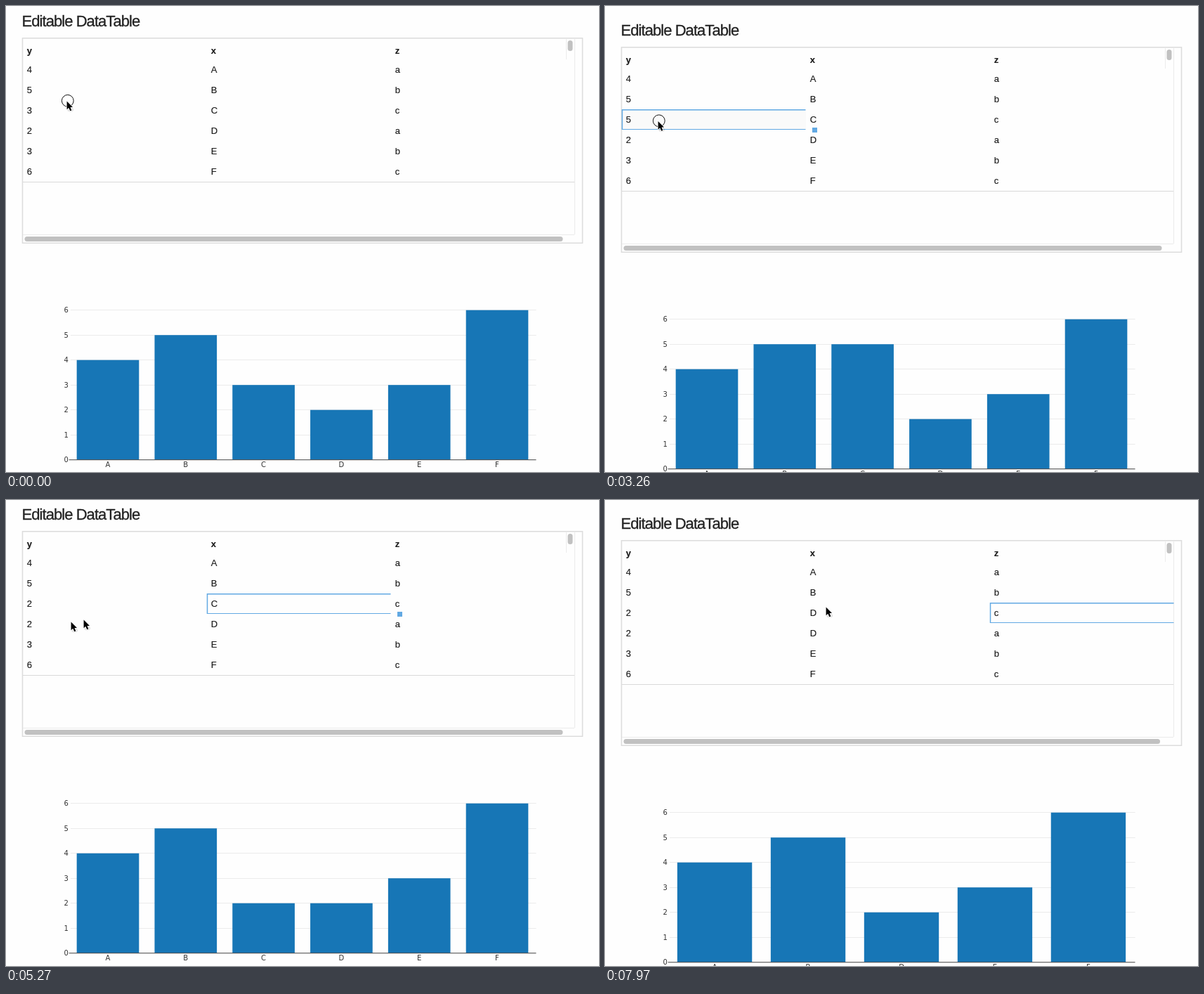
An HTML page that plays this animation: 844x663 px, repeating every 8 s.

```html
<!DOCTYPE html>
<html lang="en">
<head>
<meta charset="utf-8">
<title>Editable table</title>
<style>
html, body { margin: 0; width: 100%; height: 100%; overflow: hidden; background: #fefefe; }
svg { display: block; }
text { font: 13px "Liberation Sans", sans-serif; fill: #1c1c1c; stroke: #1c1c1c; stroke-width: .15px; }
.title { font-size: 22px; letter-spacing: -.94px; fill: #222; stroke: #222; stroke-width: .3px; }
.head { font-weight: bold; }
.tick { font: 10px "DejaVu Sans", sans-serif; fill: #333; stroke: none; }
.value { text-anchor: end; }
.label { text-anchor: middle; }
</style>
</head>
<body>
<svg id="stage" width="844" height="663"></svg>
<script>
const LOOP = 8000, BLUE = '#62a9e3';
const COLUMN_X = [24, 286, 548], COLUMN_W = 262, ROW_TOP = 76, ROW_H = 29;
const stage = document.getElementById('stage');

const initial = {
  scroll: 0, cursor: [86, 135], click: true, ghost: null, hover: null, caret: null,
  column: -1, handle: '', y3: 3, x3: 'C', bars: [4, 5, 3, 2, 3, 6], names: 'ABCDEF'
};

// Each step changes part of the state and holds until the next one.
const steps = [
  [120, { click: false }],
  [390, { cursor: [84, 136] }],
  [500, { cursor: [80.5, 138] }],
  [600, { click: true, column: 0, handle: 'open' }],
  [710, { handle: 'solid' }],
  [1190, { click: false, cursor: [82, 142], caret: 37.5 }],
  [1580, { y3: 5, column: 1, caret: null, scroll: 13, hover: [1, 523, '#fcfcfc'] }],
  [1700, { bars: [4, 5, 5, 2, 3, 6] }],
  [2660, { cursor: [82, 145], hover: null }],
  [2780, { cursor: [79, 152] }],
  [2900, { cursor: [76, 160], hover: [2, 262, '#fafafa'] }],
  [3020, { cursor: [75, 163.5], click: true, column: 0, handle: 'open' }],
  [3140, { handle: 'solid' }],
  [3380, { click: false }],
  [3500, { caret: 37.5 }],
  [3730, { y3: 2, column: 1, caret: null }],
  [3850, { bars: [4, 5, 2, 2, 3, 6] }],
  [4080, { cursor: [77, 166] }],
  [4200, { cursor: [81, 169], hover: null }],
  [4320, { cursor: [87, 172] }],
  [4440, { cursor: [92, 173] }],
  [4670, { scroll: 9 }],
  [4790, { scroll: 3 }],
  [4910, { scroll: -1 }],
  [5270, { ghost: [110, 170] }],
  [5390, { scroll: 0, ghost: null, cursor: [273, 158] }],
  [5540, { cursor: [290, 156] }],
  [5660, { cursor: [304, 154] }],
  [5780, { cursor: [311, 152.5] }],
  [5900, { cursor: [314, 152], handle: 'open' }],
  [6140, { click: true }],
  [6330, { click: false }],
  [6430, { handle: 'solid' }],
  [6910, { caret: 302.5 }],
  [7260, { x3: 'D', column: 2, caret: null, scroll: 13 }],
  [7380, { bars: [4, 5, 2, 3, 6], names: 'ABDEF' }],
  [7970, { scroll: 12 }]
];

const rect = (x, y, w, h, fill, extra = '') =>
  `<rect x="${x}" y="${y}" width="${w}" height="${h}" fill="${fill}" ${extra}/>`;
const line = (x1, y1, x2, y2, color, width = 1) =>
  `<path d="M${x1} ${y1}L${x2} ${y2}" stroke="${color}" stroke-width="${width}"/>`;
const text = (x, y, content, style = '') =>
  `<text x="${x}" y="${y}" class="${style}">${content}</text>`;

function table(s) {
  const ys = [4, 5, s.y3, 2, 3, 6], xs = ['A', 'B', s.x3, 'D', 'E', 'F'];
  let out = '';
  if (s.hover) {
    const [row, width, color] = s.hover;
    out += rect(24, ROW_TOP + row * ROW_H, width, ROW_H, color);
  }
  out += rect(23.5, 45.75, 797, 291.5, 'none', 'stroke="#dcdcdc" stroke-width="1.5"')
    + line(797.5, 47, 797.5, 76, '#ececec') + line(809.5, 47, 809.5, 325, '#ebebeb')
    + line(24, 250.5, 809, 250.5, '#d9d9d9') + line(24, 325.5, 809, 325.5, '#ebebeb')
    + rect(26.5, 328, s.column === 2 ? 763.5 : 766, 7, '#c1c1c1', 'rx="3.5"')
    + rect(799.5, 49, 7, 15, '#c1c1c1', 'rx="3.5"');
  'yxz'.split('').forEach((name, i) => out += text(COLUMN_X[i] + 5.8, 68, name, 'head'));
  ys.forEach((y, i) => {
    [y, xs[i], 'abc'[i % 3]].forEach((v, c) =>
      out += text(COLUMN_X[c] + 5.8, 94.8 + i * ROW_H, v));
  });
  return out + selection(s);
}

function selection({ column, handle, caret }) {
  if (column < 0) return '';
  const x = COLUMN_X[column], right = x + COLUMN_W - .5;
  let out = line(x + .5, 134, x + .5, 163, BLUE, 1.5)
    + line(x, 134.75, right, 134.75, BLUE, 1.5) + line(x, 162.5, right, 162.5, BLUE);
  if (column < 2) {
    out += handle === 'open'
      ? rect(x + 266.5, 155.5, 13, 13, '#fefefe', `stroke="${BLUE}"`)
      : rect(x + 271, 160, 7, 7, BLUE);
  }
  if (caret) out += line(caret, 141, caret, 156, '#222');
  return out;
}

function chart({ bars, names }) {
  const left = 89.6, zero = 645.7, unit = 35.5, pitch = 664.8 / bars.length;
  let out = '';
  for (let v = 0; v <= 6; v++) {
    const y = zero - v * unit;
    if (v) out += line(92, Math.floor(y) + .5, 754.5, Math.floor(y) + .5, '#ebebeb');
    out += text(88.8, y + 3.6, v, 'tick value');
  }
  bars.forEach((v, i) => {
    const x = left + pitch * i;
    out += rect(x + pitch * .1, zero - v * unit, pitch * .8, v * unit, '#1776b6')
      + text(x + pitch / 2, 656.4, names[i], 'tick label');
  });
  return out + line(left, zero, 754.5, zero, '#444');
}

function pointer([x, y], click) {
  return `<g transform="translate(${x + .6} ${y + .6})">`
    + (click ? '<circle cx="1.2" cy="-.8" r="8.4" fill="none" stroke="#111"/>' : '')
    + '<ellipse cx="5" cy="12" rx="4.5" ry="3" fill="#000" opacity=".1"/>'
    + '<path d="M0 0V11.6L2.7 9.2 4.7 13.7 6.8 12.8 4.9 8.5H8.4Z" fill="#000"'
    + ' stroke="#fff" stroke-width="1.4" paint-order="stroke"/></g>';
}

function draw(s) {
  stage.innerHTML = `<g transform="translate(0 ${s.scroll})">`
    + text(22.5, 28.8, 'Editable DataTable', 'title') + table(s) + chart(s) + '</g>'
    + (s.ghost ? pointer(s.ghost) : '') + pointer(s.cursor, s.click);
}

let shown = -1;
function tick() {
  const t = performance.now() % LOOP;
  const passed = steps.filter(([at]) => at <= t);
  if (passed.length !== shown) {
    shown = passed.length;
    draw(Object.assign({}, initial, ...passed.map(([, change]) => change)));
  }
  requestAnimationFrame(tick);
}
tick();
</script>
</body>
</html>
```
